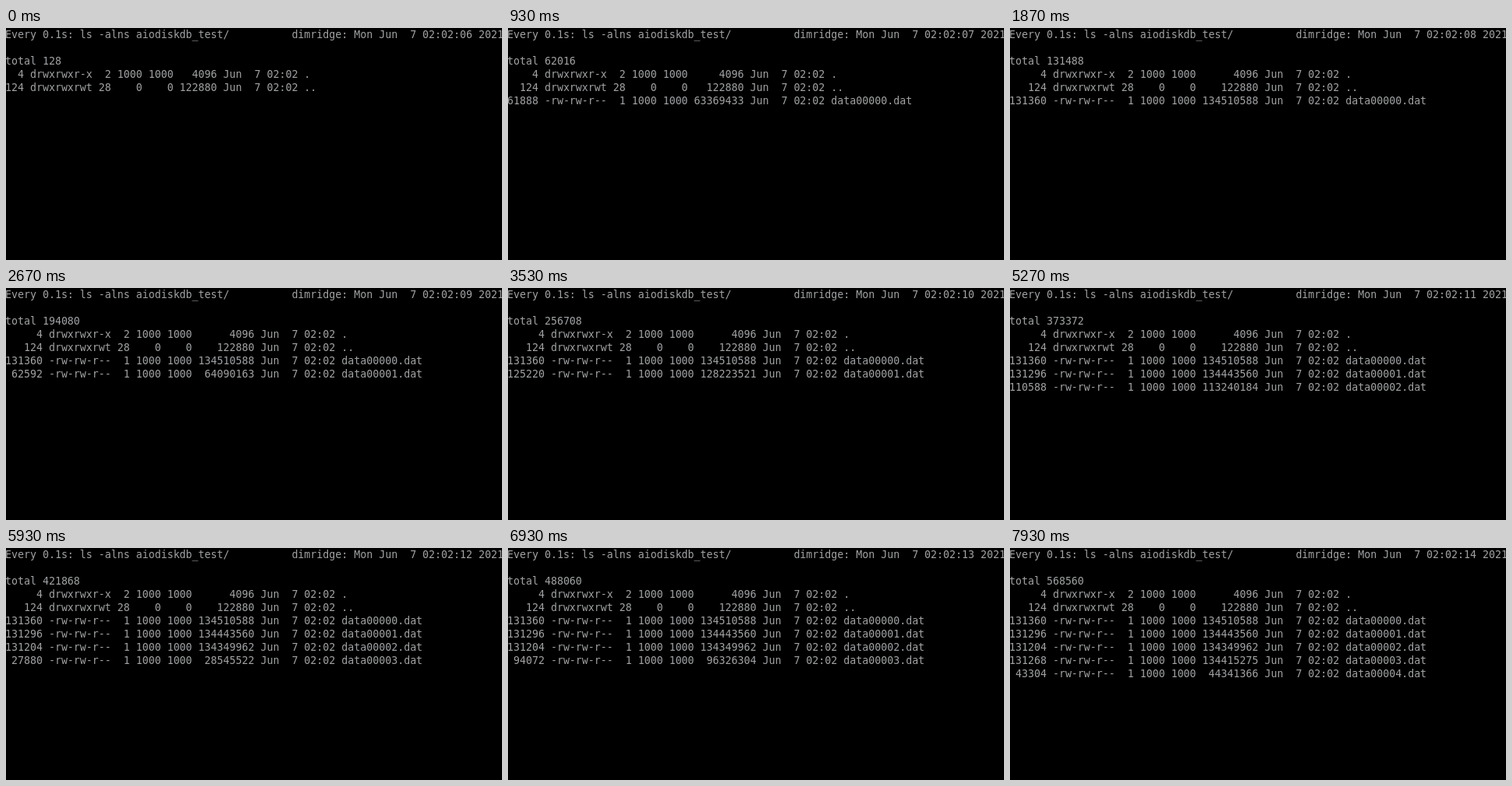
Write an HTML page that moves like this. It is 636 px wide and 298 px high and loops after 8000 ms.

```html
<!DOCTYPE html>
<html lang="en">
<head>
<meta charset="utf-8">
<title>Directory watch</title>
<style>
html, body { margin: 0; width: 100%; height: 100%; overflow: hidden; background: #000; }
pre {
  position: absolute; left: -1px; top: 0; margin: 0;
  font: 13.288px/17px "DejaVu Sans Mono", monospace;
  color: #a0a2a4;
}
</style>
</head>
<body>
<pre id="term"></pre>
<script>
const LOOP = 8000, REFRESH = 66.7, CLOCK_OFFSET = 650;
const FULL = [134510588, 134443560, 134349962, 134415275, 134400000];
const BASE = FULL.map((_, i) => FULL.slice(0, i).reduce((a, b) => a + b, 0));

// [time, bytes written so far, flushes since the previous point]
const POINTS = [
  [70, 0, 0],
  [1870, BASE[1], 4],
  [3530, BASE[2], 4],
  [4600, BASE[2] + 67869517, 2],
  [5930, BASE[3] + 34240416, 3],
  [6200, BASE[3] + 34240416, 1],
  [6930, BASE[3] + 103386111, 2],
  [7930, BASE[4] + 50819069, 2.5]
];

const term = document.getElementById("term");
const blocks = size => Math.ceil(size / 4096) * 4;

// Each flush waits briefly, then writes its chunk.
const flush = u => Math.floor(u) + Math.max(0, (u % 1 - 0.25) / 0.75);

function written(t) {
  const i = POINTS.findIndex(p => p[0] > t);
  if (i < 0) return POINTS[POINTS.length - 1][1];
  if (i === 0) return 0;
  const [t0, from] = POINTS[i - 1], [t1, to, n] = POINTS[i];
  return Math.round(from + (to - from) * flush(n * (t - t0) / (t1 - t0)) / flush(n));
}

function listing(total) {
  const rows = [
    { perm: "drwxrwxr-x", links: 2, id: 1000, size: 4096, used: 4, name: "." },
    { perm: "drwxrwxrwt", links: 28, id: 0, size: 122880, used: 124, name: ".." }
  ];
  FULL.forEach((full, i) => {
    const size = Math.min(full, total - BASE[i]);
    if (size > 0) rows.push({
      perm: "-rw-rw-r--", links: 1, id: 1000, size, used: blocks(size),
      name: `data0000${i}.dat`
    });
  });
  const width = key => Math.max(...rows.map(r => String(r[key]).length));
  const usedW = width("used"), sizeW = width("size");
  const pad = (v, w) => String(v).padStart(w);
  const sum = rows.reduce((a, r) => a + r.used, 0);
  return [`total ${sum}`, ...rows.map(r => [
    pad(r.used, usedW), r.perm, pad(r.links, 2), pad(r.id, 4), pad(r.id, 4),
    pad(r.size, sizeW), "Jun  7 02:02", r.name
  ].join(" "))].join("\n");
}

function screen(t) {
  const sec = String(6 + Math.floor((t + CLOCK_OFFSET) / 1000)).padStart(2, "0");
  const left = "Every 0.1s: ls -alns aiodiskdb_test/";
  const right = `dimridge: Mon Jun  7 02:02:${sec} 2021`;
  return left + right.padStart(80 - left.length) + "\n\n" + listing(written(t));
}

function tick() {
  const t = performance.now() % LOOP;
  // The small lead keeps each refresh on its 10 ms tick.
  const step = Math.floor((t + 4) / REFRESH) * REFRESH;
  const text = screen(Math.min(t, step + 4));
  if (term.textContent !== text) term.textContent = text;
  requestAnimationFrame(tick);
}
tick();
</script>
</body>
</html>
```
